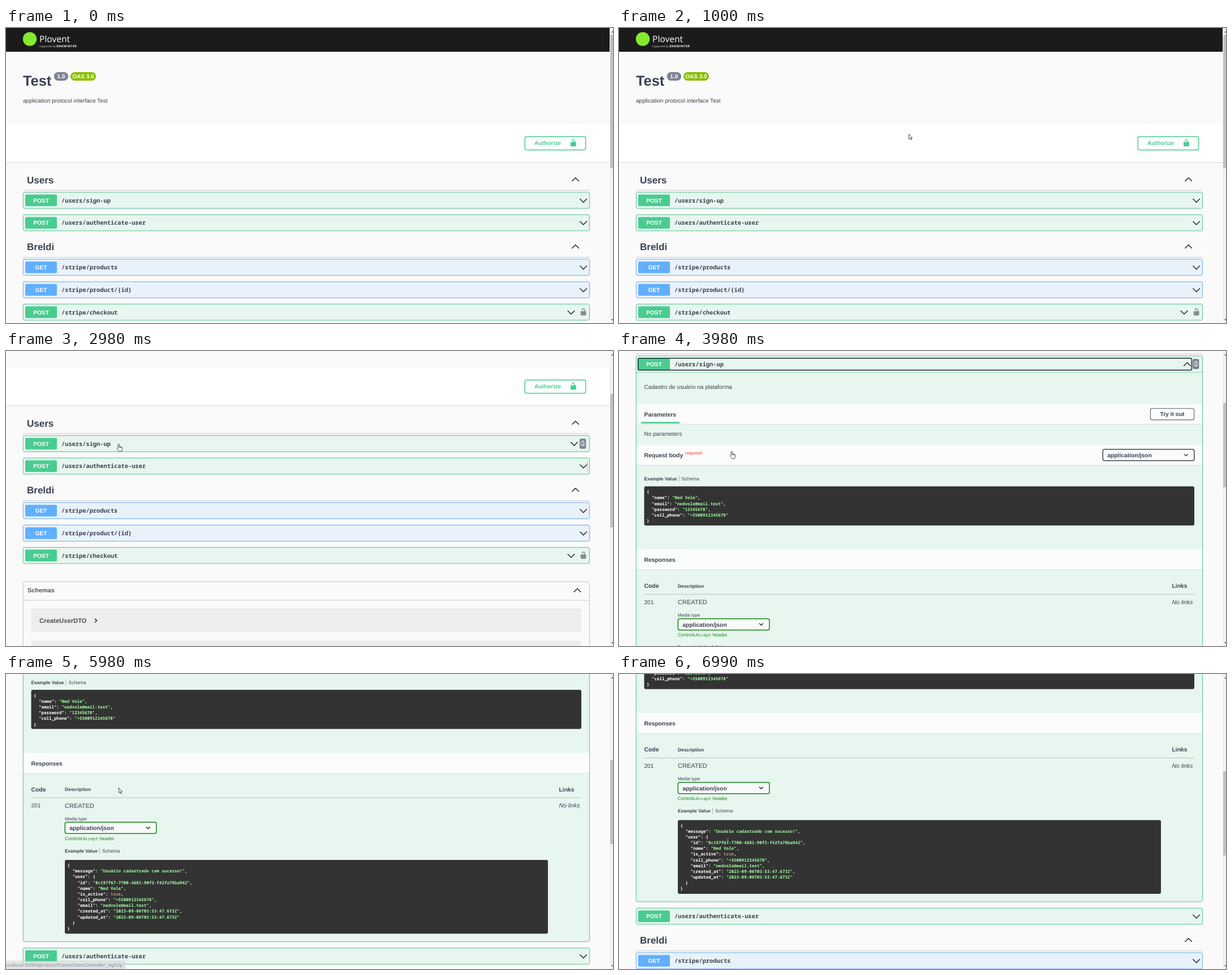
Write an HTML page that moves like this. It is 1073 px wide and 522 px high and loops after 7990 ms.

```html
<!DOCTYPE html>
<html lang="en">
<head>
<meta charset="utf-8">
<title>API docs</title>
<style>
  html, body { margin: 0; width: 100%; height: 100%; overflow: hidden; background: #fafafa; }
  svg { display: block; }
  text { font-family: "Liberation Sans", Arial, sans-serif; white-space: pre; text-rendering: geometricPrecision; }
  .mono { font-family: "Noto Sans Mono", "DejaVu Sans Mono", monospace; }
  .wide { font-family: "Open Sans", "Noto Sans", sans-serif; }
</style>
</head>
<body>
<svg id="stage" width="1073" height="522" viewBox="0 0 1073 522"></svg>
<script>
const INK = '#3b4151', GREEN = '#49cc90', BLUE = '#61affe', RULE = 'rgba(59,65,81,.3)';
const LOOP = 7990, OPEN_SHIFT = 648, BODY_Y = 282;

const attrs = o => Object.entries(o).map(([k, v]) => ` ${k}="${v}"`).join('');
const box = (x, y, x2, y2, o) => `<rect x="${x}" y="${y}" width="${x2 - x}" height="${y2 - y}"${attrs(o)}/>`;
const path = (d, o) => `<path d="${d}"${attrs(o)}/>`;
const group = (id, body, y = 0) => `<g id="${id}" transform="translate(0 ${y})">${body}</g>`;
// y is the middle of the capital letters
const label = (x, y, str, size, o = {}) =>
  `<text x="${x}" y="${(y + size * 0.36).toFixed(2)}" font-size="${size}"${attrs({ fill: INK, ...o })}>${str}</text>`;
const bold = (x, y, str, size, o = {}) => label(x, y, str, size, { 'font-weight': 700, ...o });
const rule = (x, x2, y, color = RULE) => box(x, y - 0.4, x2, y + 0.5, { fill: color });

// dir 1 points down, -1 points up
const chevron = (x, y, dir, w = 5.8, h = 2.9, weight = 1.4) =>
  path(`M${x - w} ${y - h * dir}L${x} ${y + h * dir}L${x + w} ${y - h * dir}`,
    { fill: 'none', stroke: '#1c1f26', 'stroke-width': weight, 'stroke-linecap': 'round', 'stroke-linejoin': 'round' });

const lock = (x, y, color) =>
  path('M15.8 8H14V5.6C14 2.7 12.7 1 10 1S6 2.7 6 5.6V6h2v-.8C8 3.8 8.8 3 10 3s2 .8 2 2.2V8H4c-.6 0-1 .6-1 1.2V17' +
    'c0 .6.4 1.1 1 1.3l1.2.4c.5.2 1.4.3 1.9.3h5.8c.5 0 1.4-.1 1.9-.3l1.2-.4c.6-.2 1-.7 1-1.3V9.2C17 8.6 16.4 8 15.8 8z',
    { fill: color, transform: `translate(${x} ${y}) scale(.705)` });

const frame = (y, y2, color) =>
  box(30.3, y, 1031.5, y2, { rx: 3, fill: 'none', stroke: 'rgba(0,0,0,.06)', 'stroke-width': 2.4 }) +
  box(30.3, y, 1031.5, y2, { rx: 3, fill: color, 'fill-opacity': 0.11, stroke: color, 'stroke-opacity': 0.8, 'stroke-width': 1 });

const summary = (verb, url, y) =>
  box(34, y - 10.3, 90, y + 10.3, { rx: 2, fill: verb === 'GET' ? BLUE : GREEN }) +
  bold(62, y, verb, 10.2, { fill: '#fff', 'text-anchor': 'middle' }) +
  bold(98, y, url, 10.35, { class: 'mono' });

const row = (verb, url, y) => frame(y - 14.4, y + 14.2, verb === 'GET' ? BLUE : GREEN) + summary(verb, url, y);

const tag = (name, y) => bold(37, y, name, 17) + chevron(1006.7, y - 0.5, -1) + rule(30, 1032, y + 18.6);

const copyIcon = y =>
  box(1014, y - 9, 1025.3, y + 9, { rx: 3, fill: '#7d8492' }) +
  path(`M1017 ${y - 3.5}h5v2M1017 ${y - 3.5}v7h5M1018.3 ${y - 5}h2.6M1023.4 ${y - 0.6}h-3.4v3h3.4`,
    { fill: 'none', stroke: '#fff', 'stroke-width': 0.9 });

const section = (y, y2) =>
  box(31, y, 1031, y2, { fill: 'rgba(255,255,255,.8)' }) + rule(31, 1031, y2, 'rgba(0,0,0,.1)');

const select = (x, y, color) =>
  box(x, y - 10, x + 161.5, y + 10, { rx: 3, fill: '#f8fbfa', stroke: color, 'stroke-width': 1.5 }) +
  bold(x + 8, y, 'application/json', 10.3) + chevron(x + 147, y, 1, 3, 1.5, 1.3);

const tabs = (x, y) =>
  bold(x, y, 'Example Value', 8.25) + box(x + 61, y - 5, x + 61.8, y + 5, { fill: 'rgba(59,65,81,.45)' }) +
  label(x + 66, y, 'Schema', 8.5);

function code(x, y, x2, y2, first, lines) {
  const tint = s => s.replace(/: (".*?"|true)/, (m, v) =>
    `: <tspan${attrs(v === 'true' ? { fill: '#fcc28c', 'font-weight': 400 } : { fill: '#a2fca2' })}>${v}</tspan>`);
  return box(x, y, x2, y2, { rx: 3, fill: '#333' }) + lines.map((s, i) =>
    bold(x + 4.4, first + i * 10.17, tint(s), 7.52, { class: 'mono', fill: '#fff' })).join('');
}

const top_ =
  box(0, 0, 1067, 42, { fill: '#1b1b1b' }) +
  `<circle cx="42" cy="19.5" r="12.2" fill="#85ea2d"/>` +
  label(59, 19.2, 'Plovent', 15.6, { class: 'wide', fill: '#fff' }) +
  label(59, 32.6, 'Supported by', 4.6, { class: 'wide', fill: '#ddd' }) +
  bold(89, 32.4, 'OAKMINTER', 5.3, { class: 'wide', fill: '#fff', 'letter-spacing': 0.5 }) +
  bold(30, 93, 'Test', 25.4) +
  box(84.7, 78, 110, 93.3, { rx: 7.6, fill: '#7d8492' }) +
  bold(97.3, 85.6, '1.0', 10, { fill: '#fff', 'text-anchor': 'middle' }) +
  box(114, 78, 159, 93.3, { rx: 7.6, fill: '#89bf04' }) +
  bold(136.5, 85.6, 'OAS 3.0', 10, { fill: '#fff', 'text-anchor': 'middle' }) +
  label(30, 128.5, 'application protocol interface Test', 10.1) +
  box(0, 170, 1067, 237.6, { fill: '#fff' }) +
  rule(0, 1067, 238, '#d4d4d4') +
  box(917.2, 192.2, 1024.6, 215.8, { rx: 3, fill: '#fff', stroke: GREEN, 'stroke-width': 1.5 }) +
  bold(934, 203.8, 'Authorize', 10.2, { fill: GREEN }) +
  lock(995.8, 196.2, GREEN) +
  tag('Users', 268.4);

const closed = row('POST', '/users/sign-up', 305) +
  group('plain', chevron(1020.6, 305.5, 1)) +
  group('hover', chevron(1004.4, 305.5, 1) + copyIcon(305) + box(1027, 335.5, 1027.8, 354, { fill: '#9fb5aa' }));

const focusRing = x2 => box(33.7, 12.7, x2, 33.7, { rx: 2, fill: 'none', stroke: '#20242b', 'stroke-width': 1.5 });
const open_ =
  frame(8.6, 685, GREEN) + summary('POST', '/users/sign-up', 23) +
  group('ringWide', focusRing(1028.2) + chevron(1020.6, 23.3, -1)) +
  group('ringShort', focusRing(1012.4) + chevron(1004.4, 23.3, -1) + copyIcon(23)) +
  rule(31, 1031, 37.6, 'rgba(73,204,144,.75)') +
  label(44.5, 63.8, 'Cadastro de usuário na plataforma', 10.1) +
  section(94.5, 129.5) +
  bold(44.5, 112, 'Parameters', 10.4) +
  box(39.5, 125.5, 107, 128.3, { fill: GREEN }) +
  box(939.4, 101.6, 1016.6, 121.8, { rx: 3, fill: 'none', stroke: '#7b7f88', 'stroke-width': 1.4 }) +
  bold(978, 111.8, 'Try it out', 10.2, { 'text-anchor': 'middle' }) +
  label(44.5, 146.5, 'No parameters', 10.1) +
  section(166.5, 202.3) +
  bold(44.5, 184.3, 'Request body', 10.4) +
  bold(117, 180.7, 'required', 7.45, { fill: 'rgba(255,0,0,.62)' }) +
  select(855.3, 184.1, '#41444e') +
  tabs(44.5, 226.2) +
  code(44.5, 239.5, 1017, 308.8, 249.5, [
    '{', '  "name": "Ned Vole",', '  "email": "nedvole@mail.test",',
    '  "password": "12345678",', '  "cell_phone": "+5500912345678"', '}']) +
  section(351, 387.3) +
  bold(44.5, 369.5, 'Responses', 10.35) +
  bold(44.5, 415.7, 'Code', 10.4) + bold(104, 415.7, 'Description', 8.4) + bold(977.5, 415.7, 'Links', 10.3) +
  rule(44.5, 1017, 430.4) +
  label(44.5, 444, '201', 10.1) + label(104, 444.5, 'CREATED', 11) +
  label(977.5, 444, 'No links', 10.4, { 'font-style': 'italic' }) +
  label(104, 467.2, 'Media type', 8) +
  select(104.3, 483.8, '#178417') +
  label(104, 502.5, 'Controls', 8.3, { fill: '#178417' }) +
  label(135.8, 502.5, 'Accept', 7.52, { class: 'mono', fill: '#178417' }) +
  label(165.5, 502.5, 'header.', 8.3, { fill: '#178417' }) +
  tabs(104, 524.1) +
  code(104, 540.5, 958, 671, 549.8, [
    '{', '  "message": "Usuário cadastrado com sucesso!",', '  "user": {',
    '    "id": "8c197f67-7700-4681-90f2-f42fa78ba942",', '    "name": "Ned Vole",',
    '    "is_active": true,', '    "cell_phone": "+5500912345678",',
    '    "email": "nedvole@mail.test",', '    "created_at": "2023-09-06T03:53:47.673Z",',
    '    "updated_at": "2023-09-06T03:53:47.673Z"', '  }', '}']);

const rest =
  row('POST', '/users/authenticate-user', 344.7) + chevron(1020.6, 345.2, 1) +
  tag('Breldi', 387.2) +
  row('GET', '/stripe/products', 423.5) + chevron(1020.6, 424, 1) +
  row('GET', '/stripe/product/{id}', 463.4) + chevron(1020.6, 463.9, 1) +
  row('POST', '/stripe/checkout', 502.9) + chevron(999, 503.4, 1) + lock(1013.6, 495.3, '#888e8b') +
  box(30.3, 549.3, 1031.5, 800, { rx: 3, fill: 'none', stroke: RULE, 'stroke-width': 0.9 }) +
  bold(38, 563.8, 'Schemas', 10.9, { fill: '#555' }) + chevron(1010, 564.4, -1) +
  rule(30, 1031.5, 582) +
  box(44.5, 596.6, 1017, 638.5, { rx: 3, fill: '#ededed' }) +
  bold(59, 617.6, 'CreateUserDTO', 11.25, { fill: '#505050' }) +
  path('M157.2 614.7L160.4 618L157.2 621.3', { fill: 'none', stroke: '#111', 'stroke-width': 1.4 }) +
  box(44.5, 653.6, 1017, 695, { rx: 3, fill: '#ededed' });

const status = box(-3, 508, 210.5, 525, { rx: 2, fill: '#dcdfe2', 'fill-opacity': 0.78, stroke: '#bbb', 'stroke-opacity': 0.6, 'stroke-width': 0.8 }) +
  label(-2, 515.3, 'localhost:5000/api-docs#/Users/UsersController_signUp', 8.4, { fill: '#8a8d90' });

const scrollbar = box(1067, 0, 1073, 522, { fill: '#f1f1f1' }) +
  `<rect id="thumb" x="1068" width="5" fill="#c1c1c1"/>` +
  path('M1070 8L1073 5V8zM1070 515L1073 518V515z', { fill: '#505050' });

const pen = { fill: '#fff', stroke: '#222', 'stroke-width': 0.8, 'stroke-linejoin': 'round' };
const cursors =
  group('arrow', path('M.5.5V9.3L2.5 7.5L3.9 10.6L5.2 10L3.9 7H6.6z', pen)) +
  group('hand', path('M3.1.5C3.9.5 4.3 1 4.3 1.8V5L7.9 5.7C8.9 5.9 9.5 6.5 9.5 7.5V10L8.4 13.6H3.7L.7 9.3' +
    'C.2 8.2 1.2 7.4 2 8.2V1.8C2 1 2.4.5 3.1.5zM4.3 5V7.4M6 5.4V7.6M7.8 5.8V7.8', pen)) +
  group('beam', path('M0 .5H1.5L2 1L2.5 .5H4M2 1V9M0 9.5H1.5L2 9L2.5 9.5H4', { fill: 'none', stroke: '#aaa', 'stroke-width': 0.7 }));

document.getElementById('stage').innerHTML =
  box(0, 0, 1073, 522, { fill: '#fafafa' }) +
  group('page', top_ + group('closed', closed) + group('open', open_, BODY_Y) + group('rest', rest)) +
  group('status', status) + scrollbar + cursors;

const scenes = [
  { at: 0, scroll: 0 },
  { at: 1000, scroll: 0, cursor: ['arrow', 512, 187.3] },
  { at: 1970, scroll: 0, cursor: ['hand', 974.6, 198] },
  { at: 2980, scroll: 141, cursor: ['hand', 196, 164], hover: true },
  { at: 3980, scroll: 282, cursor: ['hand', 196, 177], hover: true, open: true },
  { at: 4990, scroll: 282, cursor: ['arrow', 137, 47], open: true },
  { at: 5980, scroll: 493.5, cursor: ['arrow', 199, 201], open: true, status: true },
  { at: 6990, scroll: 564, cursor: ['beam', 190.3, 291], open: true }
];

const $ = id => document.getElementById(id);
const show = (id, on) => $(id).setAttribute('display', on ? 'inline' : 'none');
const move = (id, x, y) => $(id).setAttribute('transform', `translate(${x} ${y})`);

function render(s) {
  move('page', 0, -s.scroll);
  move('rest', 0, s.open ? OPEN_SHIFT : 0);
  show('closed', !s.open);
  show('open', s.open);
  show('plain', !s.hover);
  show('hover', s.hover);
  show('ringWide', !s.hover);
  show('ringShort', s.hover);
  show('status', s.status);
  $('thumb').setAttribute('y', 12 + s.scroll * (s.open ? 0.284 : 0.454));
  $('thumb').setAttribute('height', s.open ? 149 : 236);
  for (const kind of ['arrow', 'hand', 'beam']) {
    const on = s.cursor && s.cursor[0] === kind;
    show(kind, on);
    if (on) move(kind, s.cursor[1], s.cursor[2]);
  }
}

let start, current;
function tick(now) {
  start ??= now;
  const t = (now - start) % LOOP;
  const next = scenes.findLast(s => s.at <= t);
  if (next !== current) render(current = next);
  requestAnimationFrame(tick);
}
render(current = scenes[0]);
requestAnimationFrame(tick);
</script>
</body>
</html>
```
